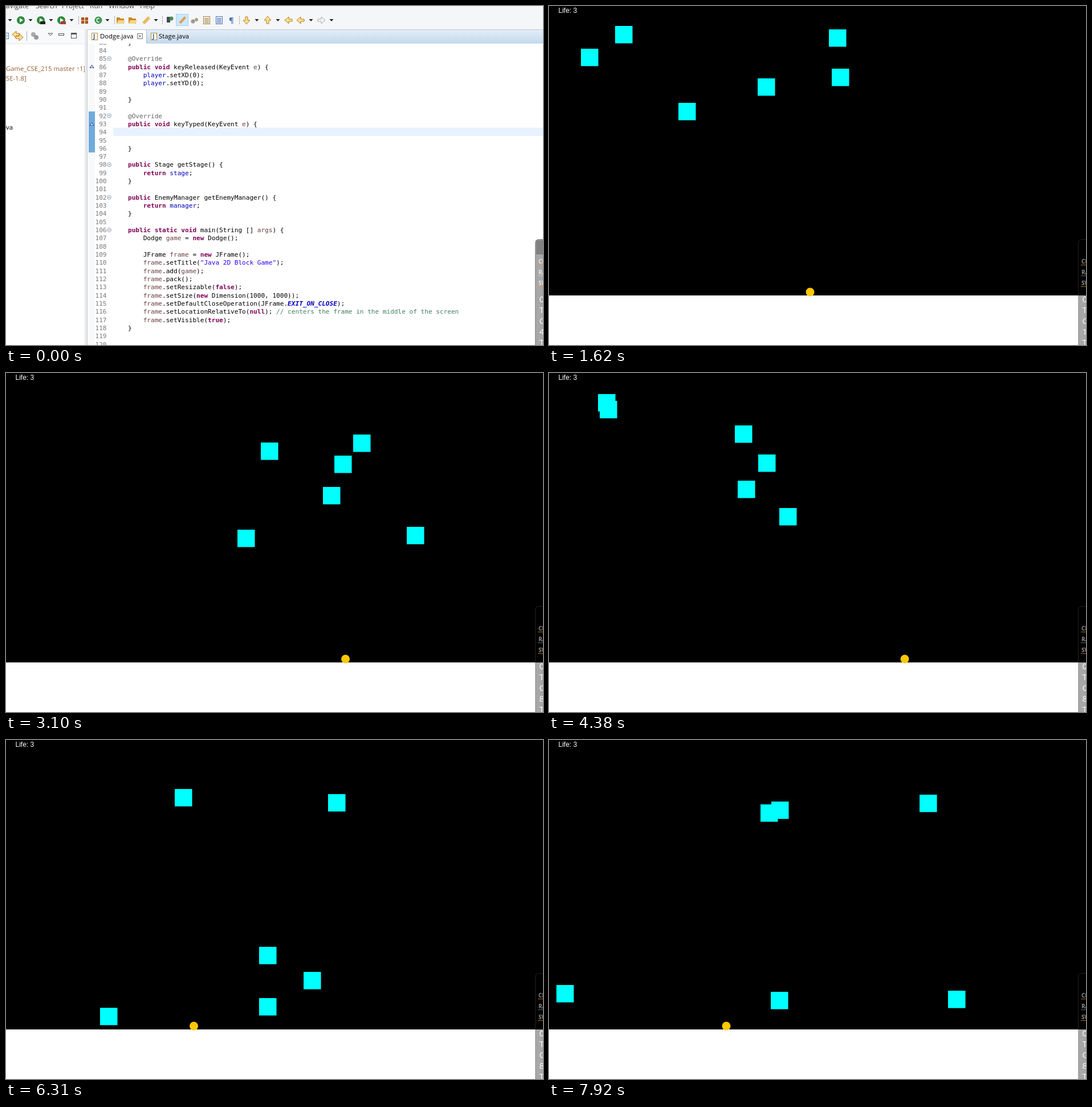
Write an HTML page with a canvas that moves like this. It is 942x595 px and loops after 7.99 s.

```html
<!DOCTYPE html>
<html>
<head>
<meta charset="utf-8">
<style>
  html, body { margin: 0; width: 100%; height: 100%; overflow: hidden; background: #fff; }
  canvas { display: block; }
</style>
</head>
<body>
<canvas id="stage" width="942" height="595"></canvas>
<script>
const ctx = document.getElementById('stage').getContext('2d');
const LOOP = 7990, GAME_START = 70, STEP = 64.3;
const UI = '"Open Sans", sans-serif';
const MONO = '11.08px "DejaVu Sans Mono", monospace';

function rect(x, y, w, h, color) {
  ctx.fillStyle = color;
  ctx.fillRect(x, y, w, h);
}
function frameRect(x, y, w, h, color) {
  ctx.strokeStyle = color;
  ctx.lineWidth = 1;
  ctx.strokeRect(x + .5, y + .5, w - 1, h - 1);
}
function text(str, x, y, color, font) {
  ctx.font = font;
  ctx.fillStyle = color;
  ctx.fillText(str, x, y);
}
function shape(color, ...points) {
  ctx.fillStyle = color;
  ctx.beginPath();
  points.forEach(([x, y]) => ctx.lineTo(x, y));
  ctx.fill();
}
function disc(x, y, r, color) {
  ctx.fillStyle = color;
  ctx.beginPath();
  ctx.arc(x, y, r, 0, 7);
  ctx.fill();
}
function gradient(y0, y1, from, to) {
  const g = ctx.createLinearGradient(0, y0, 0, y1);
  g.addColorStop(0, from);
  g.addColorStop(1, to);
  return g;
}

// ---- code editor ----
const FIRST_LINE = 83, LINE_HEIGHT = 14.32;
const CODE = `}

@Override
public void keyReleased(KeyEvent e) {
    player.setXD(0);
    player.setYD(0);

}

@Override
public void keyTyped(KeyEvent e) {


}

public Stage getStage() {
    return stage;
}

public EnemyManager getEnemyManager() {
    return manager;
}

public static void main(String [] args) {
    Dodge game = new Dodge();

    JFrame frame = new JFrame();
    frame.setTitle("Java 2D Block Game");
    frame.add(game);
    frame.pack();
    frame.setResizable(false);
    frame.setSize(new Dimension(1000, 1000));
    frame.setDefaultCloseOperation(JFrame.EXIT_ON_CLOSE);
    frame.setLocationRelativeTo(null); // centers the frame in the middle of the screen
    frame.setVisible(true);
}

`.split('\n');
const FOLDS = [85, 92, 98, 102, 106];
const TOKENS = /\/\/.*|"[^"]*"|@?\w+|\W/g;
const STYLES = [
  [/^\/\//, '#3f7f5f'],
  [/^"/, '#2a00ff'],
  [/^@/, '#646464'],
  [/^(public|static|void|return|new|null|true|false)$/, '#7f0055', 'bold '],
  [/^EXIT_ON_CLOSE$/, '#0000c0', 'italic bold '],
  [/^(player|stage|manager)$/, '#0000c0'],
  [/^(game|frame|args|e)$/, '#6a3e3e'],
  [/./, '#000', '']
];

function codeLine(line, x, y) {
  for (const token of line.match(TOKENS) || []) {
    const [, color, weight = ''] = STYLES.find(([pattern]) => pattern.test(token));
    text(token, x, y, color, weight + MONO);
    x += ctx.measureText(token).width;
  }
}

function javaIcon(x, y) {
  rect(x, y, 11, 13, '#fffdf0');
  frameRect(x, y, 11, 13, '#b58a3c');
  text('J', x + 3, y + 10, '#2a5a9c', 'bold 10px ' + UI);
}
function arrowIcon(x, y, dir, color, edge) {
  ctx.save();
  ctx.translate(x, y);
  ctx.rotate(dir);
  ctx.beginPath();
  [[-6, -2], [0, -2], [0, -6], [7, 0], [0, 6], [0, 2], [-6, 2]].forEach(p => ctx.lineTo(...p));
  ctx.closePath();
  ctx.fillStyle = color;
  ctx.fill();
  ctx.strokeStyle = edge;
  ctx.stroke();
  ctx.restore();
}
function runIcon(x, badge) {
  disc(x, 25, 7, '#2c8a3c');
  shape('#fff', [x - 2, 21], [x + 4, 25], [x - 2, 29]);
  if (badge) rect(x - 1, 27, 9, 5, badge);
}
function folderIcon(x) {
  shape('#c98a2c', [x - 7, 20], [x - 2, 20], [x, 22], [x + 6, 22], [x + 6, 31], [x - 7, 31]);
  shape('#f8d488', [x - 4, 25], [x + 8, 25], [x + 5, 31], [x - 7, 31]);
}
function pageIcon(x, color) {
  rect(x - 6, 18, 12, 14, '#fff');
  frameRect(x - 6, 18, 12, 14, color);
  for (let y = 21; y < 30; y += 2) rect(x - 4, y, 8, 1, color);
}

function toolbar() {
  rect(0, 0, 942, 41, '#f5f6f7');
  [['avigate', 0], ['Search', 52], ['Project', 98], ['Run', 147], ['Window', 180], ['Help', 235]]
    .forEach(([label, x]) => text(label, x, 4, '#444', '12px ' + UI));
  [7, 43, 79, 115, 178, 263, 440, 477, 535, 571]
    .forEach(x => shape('#222', [x - 3.5, 23], [x + 3.5, 23], [x, 27]));
  [127, 190, 274, 409].forEach(x => { for (let y = 18; y < 33; y += 3) rect(x, y, 1, 2, '#999'); });
  runIcon(26);
  runIcon(61, '#222');
  runIcon(97, '#b33a3a');
  rect(132, 20, 12, 11, '#a8542c');
  rect(137, 20, 2, 11, '#f0c890');
  rect(132, 25, 12, 1, '#f0c890');
  disc(162, 25, 6.5, '#3a9850');
  text('C', 158, 29, '#fff', 'bold 10px ' + UI);
  folderIcon(201);
  folderIcon(222);
  shape('#e8b860', [239, 29], [249, 18], [253, 22], [243, 32]);
  rect(282, 19, 6, 10, '#3a4a5c');
  disc(290, 22, 3.5, '#4a8a50');
  rect(298, 14, 22, 21, '#cce8ff');
  frameRect(298, 14, 22, 21, '#99d1ff');
  shape('#e0a050', [303, 29], [313, 18], [316, 21], [307, 31]);
  disc(328, 27, 3.5, '#999');
  disc(334, 24, 3, '#b0a080');
  pageIcon(352, '#a08040');
  pageIcon(374, '#4a70b8');
  text('¶', 391, 30, '#4a70b8', 'bold 13px ' + UI);
  const gold = '#ffe090', edge = '#b08020';
  arrowIcon(422, 25, Math.PI / 2, gold, edge);
  arrowIcon(459, 25, -Math.PI / 2, gold, edge);
  arrowIcon(496, 25, Math.PI, gold, edge);
  arrowIcon(517, 25, Math.PI, gold, edge);
  arrowIcon(553, 25, 0, '#f4f4f4', '#aaa');
}

function explorer() {
  rect(0, 41, 138, 554, '#fff');
  rect(0, 41, 138, 25, '#f7f9fb');
  rect(0, 66, 138, 1, '#e4e8ee');
  frameRect(-6, 47, 11, 11, '#5580b0');
  rect(-2, 52, 5, 1, '#5580b0');
  arrowIcon(18, 50, Math.PI, '#ffe090', '#b07020');
  arrowIcon(23, 55, 0, '#ffe090', '#b07020');
  rect(36, 44, 1, 17, '#aaa');
  disc(48, 50, 4, '#aaa');
  disc(53, 55, 4, '#999');
  ctx.strokeStyle = '#555';
  ctx.beginPath();
  [[74, 48], [82, 48], [78, 52]].forEach(p => ctx.lineTo(...p));
  ctx.closePath();
  ctx.stroke();
  frameRect(92, 48, 10, 4, '#555');
  frameRect(114, 47, 10, 10, '#555');
  rect(114, 47, 10, 3, '#555');
  text('Game_CSE_215 master ↑1]', 0, 114, '#955f32', '11.3px ' + UI);
  text('SE-1.8]', 0, 131, '#955f32', '11.3px ' + UI);
  text('va', 0, 217, '#000', '11.3px ' + UI);
}

function editor() {
  rect(138, 41, 5, 554, '#e8eaed');
  rect(142, 41, 1, 554, '#c2c8d0');
  rect(143, 41, 799, 554, '#fff');
  rect(143, 41, 799, 25, gradient(41, 66, '#e4eef8', '#c3d8ec'));
  rect(143, 41, 104, 26, '#fff');
  rect(246, 41, 1, 25, '#a8bccf');
  rect(143, 41, 799, 1, '#b8c8d8');
  javaIcon(150, 47);
  text('Dodge.java', 165, 57, '#000', '11.3px ' + UI);
  frameRect(230, 48, 10, 10, '#777');
  text('×', 231.5, 57, '#555', '11px ' + UI);
  javaIcon(254, 47);
  text('Stage.java', 268, 57, '#000', '11.3px ' + UI);

  ctx.save();
  ctx.beginPath();
  ctx.rect(143, 66, 799, 529);
  ctx.clip();
  rect(145, 66, 11, 529, '#f9f9f9');
  rect(188, 213.5, 754, 14.5, '#e8f2fe');
  rect(145, 185, 11, 72, '#5c9fd6');
  for (let y = 185; y < 257; y += 2)
    for (let x = 145 + y % 4 / 2; x < 156; x += 2) rect(x, y, 1, 1, '#a8d0f0');
  [106, 207].forEach(y => {
    shape('#5a5ab0', [146, y + 3], [150.5, y - 3], [155, y + 3]);
    shape('#fff', [148.5, y + 2], [150.5, y - 1], [152.5, y + 2]);
  });
  for (let i = 0; i < 38; i++) {
    const number = FIRST_LINE + i, y = 82 + (i - 1) * LINE_HEIGHT;
    ctx.textAlign = 'right';
    text(number, 176.5, y, '#787878', MONO);
    ctx.textAlign = 'left';
    if (FOLDS.includes(number)) {
      ctx.strokeStyle = '#93a5b5';
      ctx.beginPath();
      ctx.arc(181, y - 4, 3.5, 0, 7);
      ctx.stroke();
      rect(179, y - 4.5, 4, 1, '#708090');
    }
    codeLine(CODE[i] || '', 214, y);
  }
  ctx.restore();
}

// ---- game ----
const KEY_STEPS = [0, 5, 24, 47, 67, 97, 122];
const TOP = 15, FALL = 490, SIZE = 30.5;
// x: column of each successive drop; y: height at the key steps, two drops apart
const BLOCKS = [
  { x: [531, 240, 227, 734, 406, 300, 404, 520, 30, 565, 210, 371], y: [271, 170, 275, 237, 585, 603] },
  { x: [19, 610, 366, 156, 703, 480, 331, 150, 390, 296, 560, 390], y: [264, 127, 270, 189, 576, 598] },
  { x: [121, 410, 496, 330, 556, 194, 367, 600, 165, 715, 90, 650], y: [227, 110, 200, 143, 470, 586] },
  { x: [64, 150, 56, 500, 576, 620, 326, 250, 444, 120, 389], y: [221, 75, 145, 92, 453, 442] },
  { x: [305, 680, 491, 270, 447, 712, 89, 644, 522, 620, 700], y: [211, 41, 122, 49, 407, 440] },
  { x: [132, 330, 116, 640, 609, 390, 86, 430, 444, 350, 13], y: [200, 35, 108, 37, 363, 430] }
];
BLOCKS.forEach(b => { b.travel = [0, ...b.y.map((y, i) => y - TOP + 2 * i * FALL)]; });
const BALL_X = [196.5, 196.5, 458, 595.5, 624, 329.5, 311];

function interpolate(keys, values, k) {
  let i = 0;
  while (i < keys.length - 2 && k >= keys[i + 1]) i++;
  const part = Math.min(1, (k - keys[i]) / (keys[i + 1] - keys[i]));
  return values[i] + (values[i + 1] - values[i]) * part;
}

function game(step) {
  rect(0, 0, 942, 595, '#fff');
  rect(0, 0, 942, 508, '#000');
  ctx.save();
  ctx.beginPath();
  ctx.rect(0, 0, 942, 508);
  ctx.clip();
  for (const { x, travel } of BLOCKS) {
    const d = interpolate(KEY_STEPS, travel, step);
    rect(x[Math.floor(d / FALL)], TOP + d % FALL, SIZE, SIZE, '#0ff');
  }
  ctx.restore();
  disc(interpolate(KEY_STEPS, BALL_X, step), interpolate([5, 14], [380, 502], Math.max(5, step)), 7.5, '#ffc800');
  text('Life: 3', 16.5, 12, '#fff', '12px "Liberation Sans", sans-serif');
}

// ---- translucent system monitor at the right edge ----
function monitor(t, overGame) {
  const dim = overGame ? '#8c8c8c' : '#e6e6e6';
  const panel = ctx.createLinearGradient(928, 0, 942, 0);
  panel.addColorStop(0, 'rgba(70,70,70,.5)');
  panel.addColorStop(.4, 'rgba(70,70,70,.47)');
  panel.addColorStop(1, 'rgba(80,80,80,.5)');
  ctx.beginPath();
  ctx.roundRect(928.5, 409.5, 30, 200, 6);
  ctx.fillStyle = panel;
  if (overGame) {
    ctx.save();
    ctx.clip();
    rect(928, 508, 14, 87, panel);
    ctx.restore();
  } else {
    ctx.fill();
    rect(930, 411, 12, 25, 'rgba(70,70,70,.4)');
  }
  ctx.beginPath();
  ctx.roundRect(928.5, 409.5, 30, 200, 6);
  ctx.strokeStyle = overGame ? '#222' : '#888';
  ctx.lineWidth = 1;
  ctx.stroke();
  if (overGame) rect(928, 508, 1, 87, '#aaa');
  ['CPU', 'RAM', 'SWP'].forEach((label, i) => {
    const y = 452 + i * 19;
    text(label, 934, y, dim, 'bold 10px ' + UI);
    rect(933, y + 2, 9, 1, i === 1 ? (overGame ? '#666' : '#ccc') : (overGame ? '#a87418' : '#e8a040'));
  });
  const load = t < GAME_START ? '4' : t < 1300 ? '5' : t < 2300 ? '1' : '8';
  ['0', 'T', 'G', load, 'T'].forEach((char, i) =>
    text(char, 935.5, 520 + i * 19, '#fff', '15px "Open Sans", sans-serif'));
}

function draw(now) {
  const t = now % LOOP, playing = t >= GAME_START;
  ctx.clearRect(0, 0, 942, 595);
  if (playing) {
    game(Math.floor((t - GAME_START) / STEP));
  } else {
    toolbar();
    explorer();
    editor();
  }
  monitor(t, playing);
}

const start = performance.now();
function tick() {
  draw(performance.now() - start);
  requestAnimationFrame(tick);
}
tick();
</script>
</body>
</html>
```
